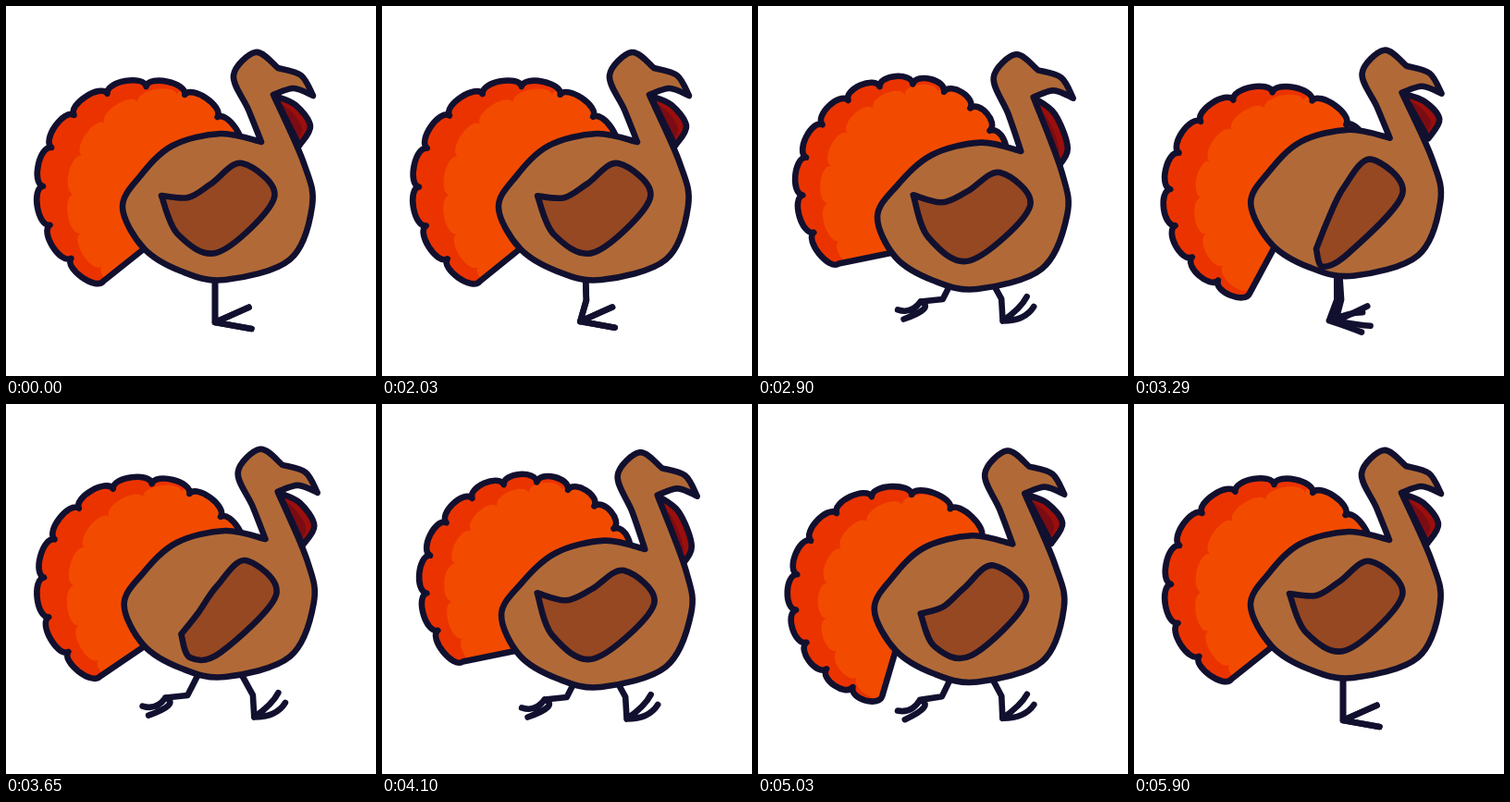
Recreate the animation shown at these times as an HTML page with a canvas. Size 400 by 400 pixels, loop 5930 ms.

```html
<!DOCTYPE html>
<html lang="en">
<head>
<meta charset="utf-8">
<title>Strutting turkey</title>
<style>
  html, body { margin: 0; width: 100%; height: 100%; overflow: hidden; background: #fff; }
  canvas { display: block; width: 100vw; height: 100vh; }
</style>
</head>
<body>
<canvas id="stage" width="400" height="400"></canvas>
<script>
const ctx = document.getElementById('stage').getContext('2d');
const LOOP = 5930, WALK_START = 2000, STEP = 30, WALK_STEPS = 130;
const BUMPS = 12;

const clamp = (v, lo = 0, hi = 1) => Math.min(hi, Math.max(lo, v));
const lerp = (a, b, t) => a + (b - a) * t;
const wave = (n, peak, period) => Math.cos(2 * Math.PI * (n - peak) / period);
const rad = degrees => degrees * Math.PI / 180;
const polar = ([x, y], degrees, r) => [x + r * Math.cos(rad(degrees)), y + r * Math.sin(rad(degrees))];

// Each part is a ring of smooth runs; runs meet in a sharp corner.
const BACK = [[276, 147], [232, 138], [180, 151], [145, 184], [126, 218], [149, 262], [190, 287],
  [237, 296], [307, 274], [331, 216], [322, 170], [289, 96]];
const BEAK_UNDER = [[289, 96], [311, 89], [332, 97]];
const BEAK_TOP = [[332, 97], [319, 75], [294, 67]];
const HEAD = [[294, 67], [270, 50], [246, 75], [262, 112], [276, 147]];
const WING = [[168, 205], [197, 207], [222, 192], [255, 170], [290, 207], [230, 266], [186, 247], [168, 205]];
const WATTLE = [[290, 97], [313, 107], [329, 130], [317, 151]];

// Angles in degrees, clockwise from straight ahead.
const STANDING = { hip: 226, thigh: 90, shin: 90, toe: -7, fan: 17, curl: 0, length: 40 };
const PASSING = { hip: 220, thigh: 88, shin: 106, toe: -7, fan: 17, curl: 0, length: 38 };
const FORWARD = { hip: 255, thigh: 60, shin: 86, toe: -36, fan: 10, curl: 18, length: 37 };
const TRAILING = { hip: 208, thigh: 118, shin: 176, toe: 152, fan: 13, curl: -75, length: 26 };

function blend(a, b, t) {
  return Object.fromEntries(Object.keys(a).map(key => [key, lerp(a[key], b[key], t)]));
}

function smooth(runs) {
  const path = new Path2D();
  path.moveTo(...runs[0][0]);
  for (const run of runs) {
    for (let i = 1; i < run.length; i++) {
      const a = run[i - 1], b = run[i];
      const before = run[i - 2] || a, after = run[i + 1] || b;
      path.bezierCurveTo(a[0] + (b[0] - before[0]) / 6, a[1] + (b[1] - before[1]) / 6,
        b[0] - (after[0] - a[0]) / 6, b[1] - (after[1] - a[1]) / 6, ...b);
    }
  }
  path.closePath();
  return path;
}

function paint(path, fill, inner, innerFill) {
  ctx.fillStyle = fill;
  ctx.fill(path);
  if (inner) {
    ctx.save();
    ctx.clip(path);
    ctx.translate(...inner);
    ctx.fillStyle = innerFill;
    ctx.fill(path);
    ctx.restore();
  }
  ctx.stroke(path);
}

// The neck leans with the head while the belly follows the bounce.
function warp(run, pose) {
  return run.map(([x, y]) => [
    x + pose.headX * clamp((260 - y) / 120),
    y + lerp(pose.headY, pose.bounce, clamp((y - 95) / 45))
  ]);
}

// A scalloped fan that rolls around the rump: s = 1 lifts it, s = -1 drops it.
function drawTail(s) {
  const centre = [150 + 4 * s + 4 * s * s, 197 - 6.5 * s + 3.5 * s * s];
  const root = [190 + 14 * s - 14 * s * s, 230 + 19 * s + 9 * s * s];
  const gap = 22.4 + 3 * s - 2.4 * s * s;
  const angle = i => -(246 - 16 * s - gap * i + 0.33 * s * i * i);
  const path = new Path2D();
  path.moveTo(...root);
  path.lineTo(...polar(centre, angle(0), 110));
  for (let i = 0; i < BUMPS; i++) {
    const a = angle(i), b = angle(i + 1), inset = (b - a) * 0.06;
    path.bezierCurveTo(...polar(centre, a + inset, 123), ...polar(centre, b - inset, 123),
      ...polar(centre, b, 110));
  }
  path.closePath();
  paint(path, '#eb3300', [33 - 3 * s - 3 * s * s, 9], '#f24b00');
}

function drawLeg(leg, bounce) {
  const hip = [leg.hip, 292 + bounce * 0.8];
  const knee = polar(hip, leg.thigh, 26 - bounce * 0.7);
  const foot = polar(knee, leg.shin, 24);
  ctx.beginPath();
  ctx.moveTo(...hip);
  ctx.lineTo(...knee);
  ctx.lineTo(...foot);
  for (const side of [-1, 1]) {
    const bend = leg.toe + leg.curl + side * leg.fan * (1 + Math.abs(leg.curl) / 25);
    ctx.moveTo(...foot);
    ctx.quadraticCurveTo(...polar(foot, bend, leg.length * 0.65),
      ...polar(foot, leg.toe + side * leg.fan, leg.length));
  }
  ctx.stroke();
}

function drawWattle(pose) {
  const droop = pose.swing * (pose.swing > 0 ? 1 : 0.3);
  const hang = warp(WATTLE, pose).map(([x, y], i) => {
    const weight = clamp((WATTLE[i][1] - 97) / 30);
    return [x - 3 * droop * weight, y + 16 * droop * weight];
  });
  paint(smooth([hang]), '#9a0f0c', [-9, 3], '#7b0c13');
}

// The tip swings most; the shoulder stays put.
function flapWing(flap) {
  return WING.map(([x, y]) => {
    const weight = flap * clamp((255 - x) / 87) ** 2;
    return [x + 21 * weight, y + 45 * weight];
  });
}

function poseAt(n) {
  const ending = clamp((WALK_STEPS - n) / 6);
  const k = clamp(n / 8) ** 2 * ending;
  const hop = wave(n, 8.5, 10), swing = wave(n, 10.5, 20);
  return {
    bounce: k * (4.5 + 9.3 * hop),
    flap: k * (0.38 - 1.05 * hop),
    headX: k * (4 + 4.8 * swing),
    headY: k * (0.6 + 3 * hop),
    swing: k * swing,
    walking: Math.min(n, 1) * ending,
    stride: clamp((n - 1) / 4) * ending * Math.abs(wave(n, 0.4, 10))
  };
}

function draw(time) {
  const n = clamp(Math.floor((time - WALK_START) / STEP), 0, WALK_STEPS) % WALK_STEPS;
  const pose = poseAt(n);
  const upright = blend(STANDING, PASSING, pose.walking);
  ctx.fillStyle = '#fff';
  ctx.fillRect(0, 0, 400, 400);
  ctx.strokeStyle = '#12102f';
  ctx.lineWidth = 6.6;
  ctx.lineCap = ctx.lineJoin = 'round';
  drawTail(pose.swing);
  for (const reach of [TRAILING, FORWARD]) drawLeg(blend(upright, reach, pose.stride), pose.bounce);
  drawWattle(pose);
  paint(smooth([BACK, BEAK_UNDER, BEAK_TOP, HEAD].map(run => warp(run, pose))), '#b16a37');
  paint(smooth([warp(flapWing(pose.flap), pose)]), '#964822');
}

function frame(now) {
  draw(now % LOOP);
  requestAnimationFrame(frame);
}
draw(0);
requestAnimationFrame(frame);
</script>
</body>
</html>
```
